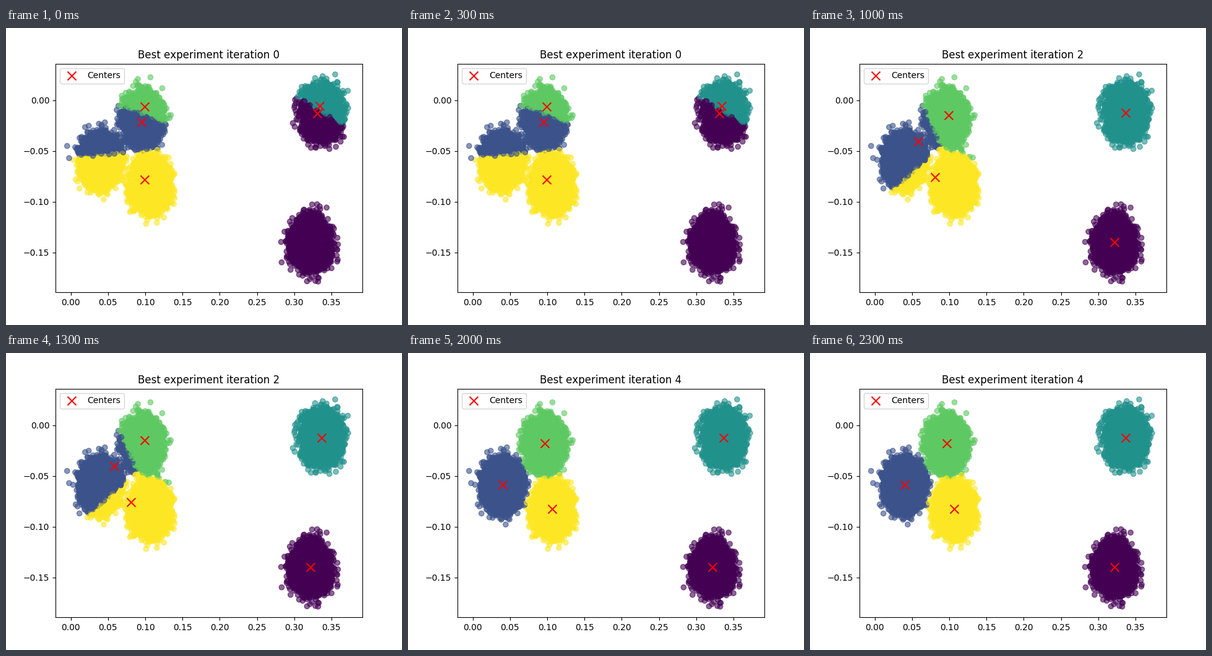
Animation, 640 px wide and 480 px high, one loop 2500 ms. Source, as a matplotlib script:

```python
import matplotlib.pyplot as plt
import numpy as np
from matplotlib.animation import FuncAnimation

STEPS = 5
SIGMA = 0.01
PER_BLOB = 10000
BLOBS = [(0.0966, -0.0181), (0.0401, -0.0590), (0.1066, -0.0827),
         (0.3368, -0.0126), (0.3218, -0.1401)]
START = [(0.3309, -0.0132), (0.0950, -0.0218), (0.3343, -0.0059),
         (0.0991, -0.0065), (0.0991, -0.0785)]


def make_points():
    rng = np.random.default_rng(7)
    blobs = [rng.normal(middle, SIGMA, (PER_BLOB, 2)) for middle in BLOBS]
    return rng.permutation(np.vstack(blobs))


def nearest(points, centers):
    gaps = points[:, None, :] - centers[None, :, :]
    return (gaps ** 2).sum(axis=2).argmin(axis=1)


def k_means(points, centers):
    """Return the (centers, labels) pair of every iteration."""
    history = []
    for _ in range(STEPS):
        labels = nearest(points, centers)
        history.append((centers, labels))
        centers = np.array([points[labels == k].mean(axis=0)
                            for k in range(len(centers))])
    return history


points = make_points()
history = k_means(points, np.array(START))
centers, labels = history[0]

plt.rcParams["text.kerning_factor"] = 6
fig, ax = plt.subplots(figsize=(6.4, 4.8), dpi=100)
dots = ax.scatter(points[:, 0], points[:, 1], c=labels, cmap="viridis",
                  vmin=0, vmax=len(START) - 1, alpha=0.6)
marks = ax.scatter(centers[:, 0], centers[:, 1], marker="x", c="red",
                   s=100, label="Centers")
ax.set_xlim(-0.02052, 0.39161)
ax.set_ylim(-0.18939, 0.03598)
ax.set_xticks(np.arange(8) * 0.05)
ax.set_yticks(np.arange(-3, 1) * 0.05)
ax.legend(loc="upper left")
title = ax.set_title("")


def update(i):
    centers, labels = history[i]
    dots.set_array(labels)
    marks.set_offsets(centers)
    title.set_text(f"Best experiment iteration {i}")
    return dots, marks, title


anim = FuncAnimation(fig, update, frames=STEPS, interval=500, repeat=True)
plt.show()
```
